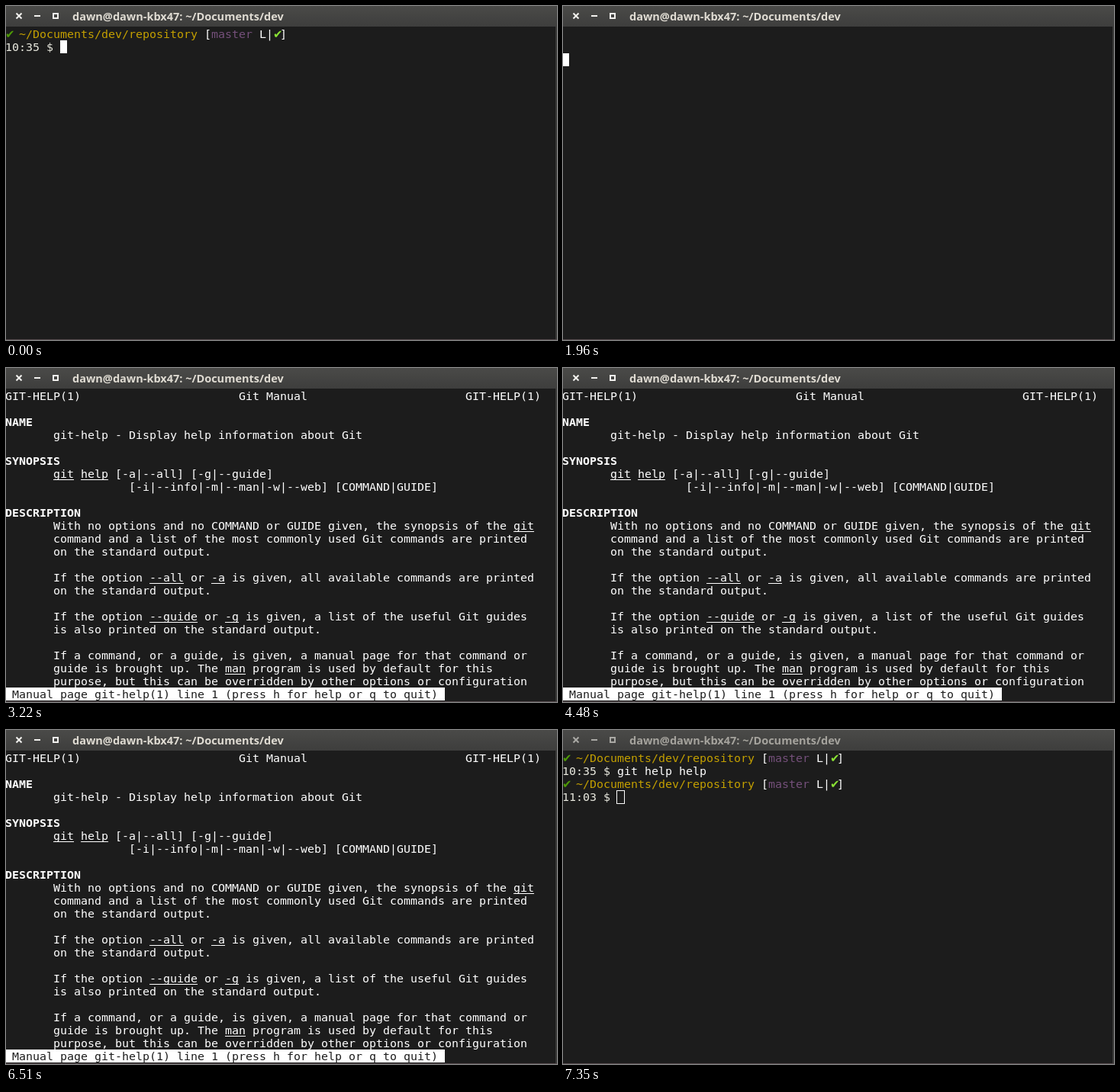
Animation of 722x438 px, one loop 7490 ms. Source, as an HTML page with a canvas:

```html
<!DOCTYPE html>
<html lang="en">
<head>
<meta charset="utf-8">
<title>Terminal</title>
<style>
  html, body { margin: 0; width: 100%; height: 100%; overflow: hidden; background: #1c1c1c; }
  canvas { display: block; }
</style>
</head>
<body>
<canvas id="stage" width="722" height="438"></canvas>
<script>
const ctx = document.getElementById('stage').getContext('2d');
const LOOP = 7490;
const CELL_W = 9, CELL_H = 17, TOP = 28;
const BG = '#1c1c1c', WHITE = '#ffffff', PALE = '#e9e9df';
const YELLOW = '#c4a000', PURPLE = '#75507b', GREEN = '#4e9a06', LIME = '#8ae234';
const MONO = '14.95px "DejaVu Sans Mono", monospace';

const COMMAND = 'git help help';
// [time, characters typed]
const KEYS = [[420, 1], [490, 2], [560, 3], [630, 4], [840, 5], [980, 6], [1050, 8],
              [1190, 9], [1400, 10], [1540, 11], [1610, 12], [1680, 13]];
const CLEAR = 1960, MANUAL = 2030, QUIT = 6510, SHELL = 6580, CURSOR_OFF = 7140, BLUR = 7350;
const BLINKS = [2590, 3220, 3850, 4480, 5110, 5740, 6370, QUIT];

// [row, column, text]; *bold*, _underlined_
const PAGE = [
  [0, 0, 'GIT-HELP(1)'], [0, 34, 'Git Manual'], [0, 67, 'GIT-HELP(1)'],
  [2, 0, '*NAME*'],
  [3, 7, 'git-help - Display help information about Git'],
  [5, 0, '*SYNOPSIS*'],
  [6, 7, '_git_ _help_ [-a|--all] [-g|--guide]'],
  [7, 18, '[-i|--info|-m|--man|-w|--web] [COMMAND|GUIDE]'],
  [9, 0, '*DESCRIPTION*'],
  [10, 7, 'With no options and no COMMAND or GUIDE given, the synopsis of the _git_'],
  [11, 7, 'command and a list of the most commonly used Git commands are printed'],
  [12, 7, 'on the standard output.'],
  [14, 7, 'If the option _--all_ or _-a_ is given, all available commands are printed'],
  [15, 7, 'on the standard output.'],
  [17, 7, 'If the option _--guide_ or _-g_ is given, a list of the useful Git guides'],
  [18, 7, 'is also printed on the standard output.'],
  [20, 7, 'If a command, or a guide, is given, a manual page for that command or'],
  [21, 7, 'guide is brought up. The _man_ program is used by default for this'],
  [22, 7, 'purpose, but this can be overridden by other options or configuration']
];
const STATUS = ' Manual page git-help(1) line 1 (press h for help or q to quit)';

const colX = col => col * CELL_W - 1;
const rowY = row => TOP + row * CELL_H;

function box(x, y, w, h, color) {
  ctx.fillStyle = color;
  ctx.fillRect(x, y, w, h);
}

// Writes on the character grid and returns the next free column.
function write(row, col, text, color) {
  let bold = false, underline = false;
  ctx.fillStyle = color;
  for (const ch of text) {
    if (ch === '*') { bold = !bold; continue; }
    if (ch === '_') { underline = !underline; continue; }
    ctx.font = (bold ? 'bold ' : '') + MONO;
    ctx.fillText(ch, colX(col), rowY(row) + 14);
    if (underline) ctx.fillRect(colX(col), rowY(row) + 16, CELL_W, 1);
    col++;
  }
  return col;
}

function tick(row, col, color) {
  ctx.font = '15px "DejaVu Sans", sans-serif';
  ctx.fillStyle = color;
  ctx.fillText('\u2714', colX(col), rowY(row) + 14);
}

function cursor(row, col) {
  const x = Math.max(0, colX(col));
  box(x, rowY(row), colX(col + 1) - x, CELL_H, WHITE);
}

function titleBar(focused) {
  const shade = ctx.createLinearGradient(0, 0, 0, 27);
  shade.addColorStop(0, '#4a4a48');
  shade.addColorStop(1, '#3e3e3d');
  box(0, 0, 722, 27, shade);

  const ink = focused ? '#f2f1ee' : '#aaa9a5';
  ctx.strokeStyle = ink;
  ctx.lineWidth = 2;
  ctx.beginPath();
  ctx.moveTo(13.5, 9.5); ctx.lineTo(20.5, 16.5);
  ctx.moveTo(20.5, 9.5); ctx.lineTo(13.5, 16.5);
  ctx.stroke();
  box(37, 12, 8, 2, ink);
  ctx.strokeRect(62, 10, 6, 6);

  ctx.font = 'bold 14.5px "Noto Sans", "Open Sans", sans-serif';
  ctx.fillStyle = focused ? '#dfdbd2' : '#a5a39d';
  ctx.fillText('dawn@dawn-kbx47: ~/Documents/dev', 87, 19);
}

function prompt(row, time) {
  tick(row, 0, GREEN);
  write(row, 2, '~/Documents/dev/repository', YELLOW);
  write(row, 29, '[', WHITE);
  write(row, 30, 'master', PURPLE);
  write(row, 37, 'L|', WHITE);
  tick(row, 39, LIME);
  write(row, 40, ']', WHITE);
  write(row + 1, 0, time + ' $', PALE);
}

function typing(t) {
  let count = 0;
  for (const [at, n] of KEYS) if (t >= at) count = n;
  prompt(0, '10:35');
  cursor(1, write(1, 8, COMMAND.slice(0, count), WHITE));
}

function manual(t) {
  for (const [row, col, text] of PAGE) write(row, col, text, WHITE);
  const end = STATUS.length;
  box(0, rowY(23), colX(end), CELL_H, WHITE);
  write(23, 0, STATUS, BG);
  const flips = BLINKS.filter(at => t >= at).length;
  if (flips % 2 === 0) cursor(23, end);
}

function shell(t) {
  prompt(0, '10:35');
  write(1, 8, COMMAND, WHITE);
  prompt(2, '11:03');
  if (t < CURSOR_OFF) cursor(3, 8);
  if (t >= BLUR) {
    ctx.strokeStyle = WHITE;
    ctx.lineWidth = 1;
    ctx.strokeRect(colX(8) - 0.5, rowY(3) + 0.5, 10, 17);
  }
}

function draw(t) {
  box(0, 0, 722, 438, BG);
  titleBar(t < BLUR);
  if (t < CLEAR) typing(t);
  else if (t < MANUAL) cursor(2, 0);
  else if (t < SHELL) manual(t);
  else shell(t);
  box(720, 27, 2, 411, '#3a3a39');
  box(0, 437, 722, 1, '#54494c');
}

const start = performance.now();
function frame() {
  draw((performance.now() - start) % LOOP);
  requestAnimationFrame(frame);
}
frame();
</script>
</body>
</html>
```
